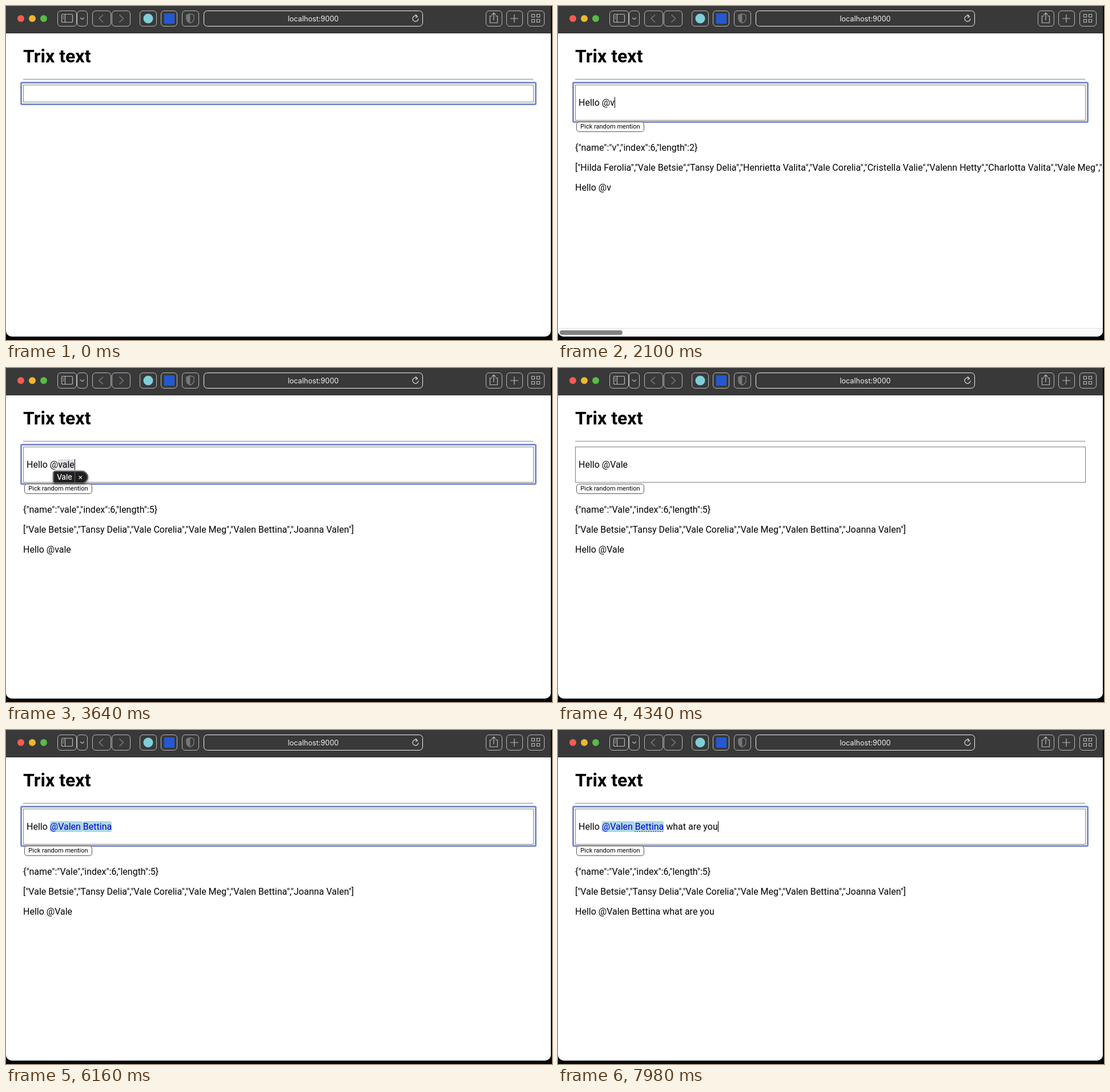
An HTML page that plays this animation: 956 px wide and 586 px high, repeating every 8000 ms.

```html
<!DOCTYPE html>
<html lang="en">
<head>
<meta charset="utf-8">
<title>Trix text</title>
<style>
html, body { margin: 0; width: 100%; height: 100%; overflow: hidden; background: #050607; }
body { position: relative; font: 16px/19px Roboto, sans-serif; color: #000; }
div, svg { position: absolute; left: 0; top: 0; box-sizing: border-box; white-space: nowrap; }
#win { width: 954px; height: 580px; background: #fff; border-radius: 0 0 10px 10px; overflow: hidden; }
#title { left: 30px; top: 69px; font: bold 32px/38px Roboto, sans-serif; }
#rule { left: 30px; top: 128px; width: 893px; height: 1px; background: #858585; }
#ring { left: 25px; top: 133px; width: 904px; border: 3px solid #7c8dca; border-radius: 3px; }
#box { left: 30px; top: 138px; width: 894px; border: 1px solid #808080; }
#edit { left: 36px; top: 160px; white-space: pre; }
#caret { display: inline-block; width: 1px; height: 19px; margin-right: -1px; background: #000; vertical-align: top; }
.guess { background: #dfe2e7; }
.mention { background: #add8e6; color: #0000d0; border-radius: 3px; }
.typo { text-decoration: underline dotted #d6487c 1.5px; text-underline-offset: 2px; text-decoration-skip-ink: none; }
#button { left: 32px; top: 203px; width: 119px; height: 18px; border: 1px solid #555; border-radius: 5px;
  font-size: 11px; line-height: 16px; text-align: center; background: #fff; }
#info, #list, #out { left: 30px; }
#info { top: 239px; }
#list { top: 274px; }
#out { white-space: pre; }
#bubble { left: 82px; top: 180px; width: 62px; height: 23px; border: 1px solid #555; border-radius: 5px 12px 12px 5px;
  background: #1f1f1f; box-shadow: inset 0 0 0 1px #777, 0 2px 5px #0005;
  font: 500 13px/20px Inter, sans-serif; color: #fff; padding-left: 6px; }
#bubble i { position: absolute; left: 37px; top: 1px; width: 1px; height: 19px; background: #666; }
#bubble b { position: absolute; left: 43px; font-weight: 400; }
#scroll { top: 565px; width: 954px; height: 15px; border-top: 1px solid #dedede; background: #fbfbfb; }
#thumb { left: 3px; top: 3px; height: 8px; border-radius: 4px; background: #828282; }
</style>
</head>
<body>
<div id="win">
  <svg width="954" height="48" fill="none" stroke="#b9b9b9">
    <path d="M0 0H954V48H0z" fill="#393939" stroke="none"/>
    <path d="M0 47.5H954" stroke="#2a2a2a"/>
    <g stroke="none">
      <circle cx="26" cy="22" r="6" fill="#f45c55"/>
      <circle cx="46" cy="22" r="6" fill="#eab932"/>
      <circle cx="66" cy="22" r="6" fill="#58bd45"/>
      <circle cx="249" cy="22" r="8.5" fill="#7fcfd9"/>
      <rect x="277" y="13" width="18" height="18" fill="#2459d3"/>
    </g>
    <g id="frames"></g>
    <rect x="346.5" y="8.5" width="383" height="27" rx="6" stroke="#f2f2f2"/>
    <g stroke-width="1.2">
      <rect x="97.5" y="14.5" width="19" height="14" rx="2"/>
      <path d="M103.5 14.5v14M99.5 17.5h2M99.5 20h2M99.5 22.5h2M130 20.5l3.5 3 3.5-3"/>
      <path d="M170 15.5l-7 6.5 7 6.5M198.500 15.5l7 6.5-7 6.5" stroke="#858585"/>
      <path d="M322.5 13.5l6.5 2.5v6c0 4-3 6.5-6.5 8-3.5-1.5-6.5-4-6.5-8v-6z" stroke="#858585"/>
      <path d="M322.5 13.5v16.5c-3.5-1.5-6.5-4-6.5-8v-6z" fill="#777" stroke="none"/>
      <path d="M720.5 18.5a5 5 0 1 0 1.5 3.5M717 15l3.5 3.5-3.5 2" stroke="#ddd"/>
      <path d="M851 17.5h-3.5v12h13v-12h-3.5M854 25v-12.5M850.5 15.5l3.5-3.5 3.5 3.5M890 15v14M883 22h14"/>
      <path d="M920.5 14.5h5v5h-5zM929.5 14.5h5v5h-5zM920.5 23.5h5v5h-5zM929.5 23.5h5v5h-5z"/>
    </g>
    <text x="538" y="27" text-anchor="middle" font-family="Inter, sans-serif" font-size="12.6" fill="#f4f4f4" stroke="none">localhost:9000</text>
  </svg>
  <div id="title">Trix text</div>
  <div id="rule"></div>
  <div id="ring"></div>
  <div id="box"></div>
  <div id="edit"><span id="plain"></span><span id="tag"></span><span id="typo"></span><span id="tail"></span><span id="caret"></span></div>
  <div id="extra">
    <div id="button">Pick random mention</div>
    <div id="info"></div>
    <div id="list"></div>
  </div>
  <div id="out"></div>
  <div id="bubble">Vale<i></i><b>×</b></div>
  <div id="scroll"><div id="thumb"></div></div>
</div>
<script>
const $ = id => document.getElementById(id);
const LOOP = 8000, STEP = 70;
const BUBBLE = 2940, BLUR = 3990, PICK = 4410, SPELL = 7280;

const greeting = "Hello @vale";
const greetingKeys = [630, 910, 1050, 1190, 1260, 1470, 1680, 2100, 2240, 2450, 2590];
const question = " what are you";
const questionKeys = [6230, 6580, 6790, 6930, 7070, 7140, 7280, 7350, 7490, 7560, 7700, 7840, 7980];
const allKeys = [...greetingKeys, PICK, ...questionKeys];

const many = ["Hilda Ferolia", "Vale Betsie", "Tansy Delia", "Henrietta Valita", "Vale Corelia", "Cristella Valie",
  "Valenn Hetty", "Charlotta Valita", "Vale Meg", "Marla Valisa"];
const few = ["Vale Betsie", "Tansy Delia", "Vale Corelia", "Vale Meg", "Valen Bettina", "Joanna Valen"];
const thumbs = [60, 110, 300, 434];

$("frames").innerHTML = [[90, 33], [124, 18], [151, 32], [185, 32], [234, 29], [271, 28], [308, 29], [840, 28], [876, 28], [913, 29]]
  .map(([x, w]) => `<rect x="${x + .5}" y="8.5" width="${w}" height="27" rx="5.5"/>`).join("");

const show = (id, on) => $(id).style.display = on ? "" : "none";
const typed = (text, keys, t) => text.slice(0, keys.filter(k => k <= t).length);

function caretAlpha(t) {
  const last = allKeys.filter(k => k <= t).pop();
  if (last === undefined || (t >= BLUR && t < PICK)) return 0;
  const p = (t - last) % 980;
  if (p < 350) return 1;
  return p < 840 ? Math.max(0, 1 - (p - 280) / 210) : (p - 840) / 140;
}

function draw(now) {
  const t = Math.floor(now % LOOP / STEP) * STEP;
  const picked = t >= PICK, guess = t >= BUBBLE && t < BLUR;
  const text = t >= BLUR ? "Hello @Vale" : typed(greeting, greetingKeys, t);
  const tail = typed(question, questionKeys, t);
  const query = text.slice(7), open = text.length > 6;
  const wide = open && query.length < 4;

  $("plain").textContent = picked ? "Hello " : guess ? "Hello @" : text;
  $("tag").textContent = picked ? "@Valen " : guess ? query : "";
  $("tag").className = picked ? "mention" : "guess";
  $("typo").textContent = picked ? "Bettina" : "";
  $("typo").className = t >= SPELL ? "mention typo" : "mention";
  $("tail").textContent = tail;
  $("caret").style.opacity = caretAlpha(t);

  $("ring").style.height = (text ? 72 : 41) + "px";
  $("box").style.height = (text ? 63 : 31) + "px";
  show("ring", t < BLUR || picked);
  show("extra", open);
  show("bubble", guess);
  show("scroll", wide);
  if (open) {
    $("info").textContent = JSON.stringify({ name: query, index: 6, length: query.length + 1 });
    $("list").textContent = JSON.stringify(wide ? many : few);
  }
  if (wide) $("thumb").style.width = thumbs[query.length] + "px";
  $("out").style.top = (open ? 309 : 216) + "px";
  $("out").textContent = tail ? "Hello @Valen Bettina" + tail : text;
}

function tick() {
  draw(performance.now());
  requestAnimationFrame(tick);
}
tick();
</script>
</body>
</html>
```
